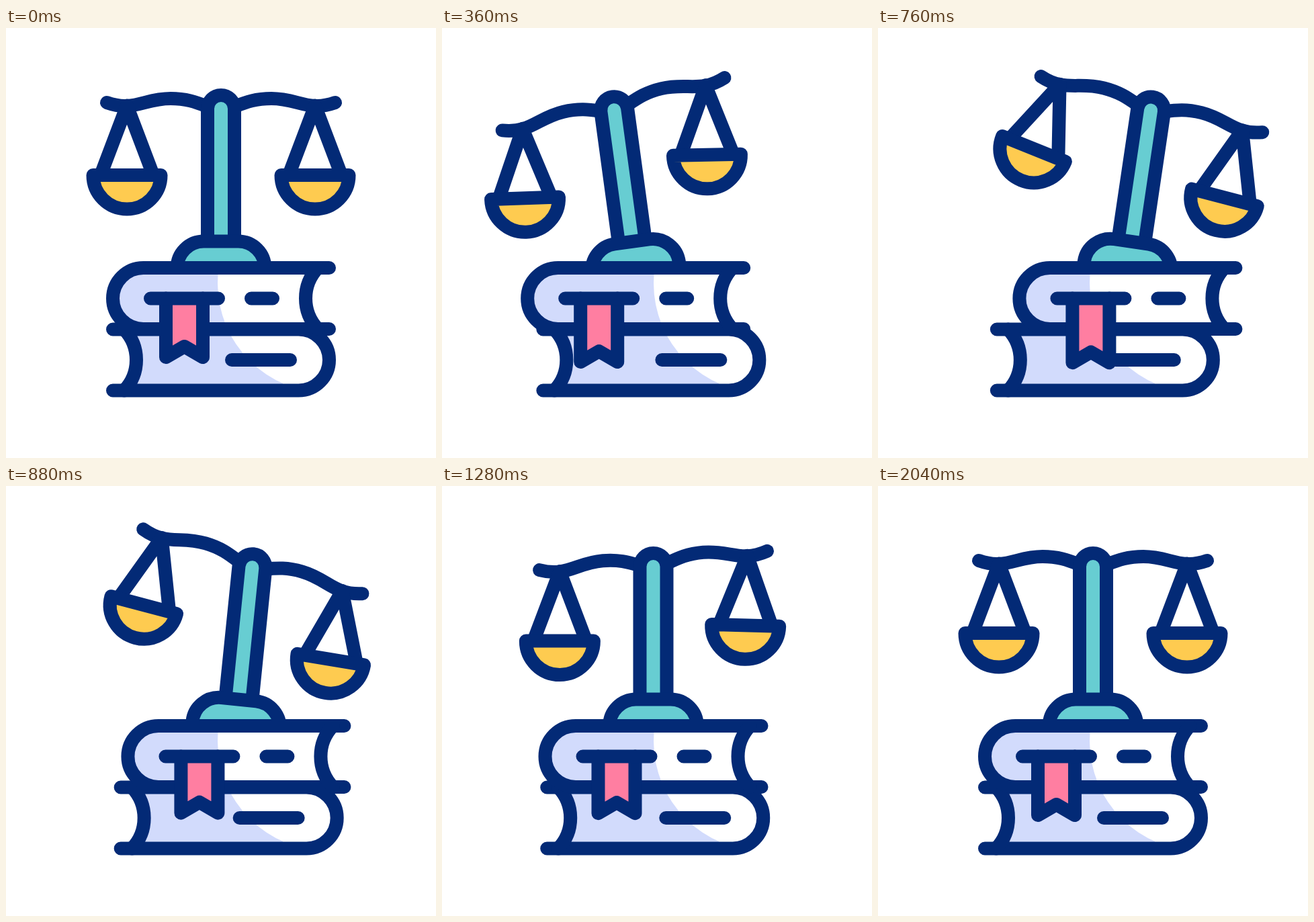
Write an HTML page with a canvas that moves like this. It is 640x640 px and loops after 2240 ms.

```html
<!DOCTYPE html>
<html lang="en">
<head>
<meta charset="utf-8">
<title>Scales on books</title>
<style>
html, body { margin: 0; width: 100%; height: 100%; overflow: hidden; background: #fff; }
canvas { display: block; width: 640px; height: 640px; }
</style>
</head>
<body>
<canvas id="stage" width="640" height="640"></canvas>
<script>
const ctx = document.getElementById('stage').getContext('2d');
const NAVY = '#032a76', TEAL = '#67cdd2', GOLD = '#fecb50', PINK = '#ff7ea1', SHADE = '#d2dbfc';
const LOOP = 2240, STEP = 40, LAST = 2040;
const QUICKEN = 0.82;

const smooth = p => p * p * (3 - 2 * p);

// Swings from rest through the peaks: the first is reached at `first`,
// the others one beat apart, each beat `ratio` times the one before.
function swing(t, start, first, beat, ratio, ...peaks) {
  let from = 0, end = first;
  for (const peak of peaks) {
    if (t < end) {
      const p = Math.max(0, (t - start) / (end - start));
      return from + (peak - from) * smooth(p);
    }
    from = peak;
    start = end;
    end += beat;
    beat *= ratio;
  }
  return from;
}

// Each part lags behind the one that carries it.
function pose(t) {
  return {
    topBook: swing(t, 0, 280, 440, QUICKEN, -40, 54, -22, 0),
    lowBook: swing(t, 0, 240, 280, 1, -24, 15, 18, -14, 0),
    column: swing(t, 180, 440, 340, QUICKEN, -10, 8.6, -0.9, 0),
    beam: swing(t, 180, 490, 400, QUICKEN, -9, 10.6, -5.5, 0),
    panLeft: swing(t, 300, 550, 245, 1, -14, 24, -9, 0, 2.8, -1, 0),
    panRight: swing(t, 300, 550, 245, 1, -8, 16, -7.4, 1.5, 0.4, -1, 0),
    ribbon: swing(t, 200, 580, 475, 1, 18.4, -13, 9, 0)
  };
}

function turn(x, y, deg) {
  ctx.translate(x, y);
  ctx.rotate(deg * Math.PI / 180);
  ctx.translate(-x, -y);
}

function group(draw) {
  ctx.save();
  draw();
  ctx.restore();
}

function shape(d, fill, cap = 'round') {
  const path = new Path2D(d);
  if (fill) {
    ctx.fillStyle = fill;
    ctx.fill(path);
  }
  ctx.lineCap = cap;
  ctx.stroke(path);
}

// Half of the beam with its pan; `side` is -1 for left, 1 for right.
function arm(side, angle) {
  group(() => {
    ctx.translate(320, 0);
    ctx.scale(side, 1);
    shape('M170 111 C130 125 115 105 75 105 C52 105 38 110 20 117');
    turn(140, 115.5, side * angle);
    shape('M101 218.5 L140 115.5 L179 218.5');
    shape('M89.5 219 H190.5 A50.5 50.5 0 0 1 89.5 219 Z', GOLD);
  });
}

function scales(s) {
  group(() => {
    ctx.translate(s.topBook, 0);
    turn(320, 357, s.column);
    group(() => {
      const tilt = s.column + s.beam;
      turn(320, 111, s.beam);
      arm(-1, s.panLeft - tilt);
      arm(1, s.panRight - tilt);
    });
    shape('M300 317 V120 A20 20 0 0 1 340 120 V317', TEAL, 'butt');
    shape('M254.7 365 V357 A39.5 39.5 0 0 1 294.2 317.5 H345.8 A39.5 39.5 0 0 1 385.3 357 V365', TEAL, 'butt');
  });
}

// One book, open side to the right; the lower one is mirrored.
function book(dx, y, mirror) {
  group(() => {
    ctx.translate(320 + dx, y);
    ctx.scale(mirror ? -1 : 1, 1);
    ctx.translate(-320, 0);
    const edge = 'M464.2 0 A66 66 0 0 0 464.2 91';
    const body = new Path2D(`${edge} H204.5 A45.5 45.5 0 0 1 204.5 0 Z`);
    ctx.fillStyle = '#fff';
    ctx.fill(body);
    group(() => {
      ctx.clip(body);
      // The light area keeps its place on the stage.
      ctx.setTransform(1, 0, 0, 1, 0, 0);
      ctx.fillStyle = SHADE;
      ctx.fillRect(0, 340, 412, 220);
      ctx.fillStyle = '#fff';
      ctx.beginPath();
      ctx.arc(478, 380, 163, 0, 2 * Math.PI);
      ctx.fill();
    });
    shape('M481 0 H204.5 A45.5 45.5 0 0 0 204.5 91 H481');
    shape(edge);
  });
}

function ribbon(drop) {
  const tip = 490 + drop;
  shape(`M238 402.5 V${tip} l27.5 -16 l27.5 16 V402.5`, PINK);
}

function draw(t) {
  const s = pose(t);
  ctx.fillStyle = '#fff';
  ctx.fillRect(0, 0, 640, 640);
  ctx.strokeStyle = NAVY;
  ctx.lineWidth = 20;
  ctx.lineJoin = 'round';

  scales(s);
  book(s.lowBook, 448.5, true);
  group(() => {
    ctx.translate(s.lowBook, 0);
    shape('M336 494 H423');
  });
  book(s.topBook, 357, false);
  group(() => {
    ctx.translate(s.topBook, 0);
    ribbon(s.ribbon);
    shape('M215 402.5 H316 M365 402.5 H397');
  });
}

const start = performance.now();
function tick() {
  const t = (performance.now() - start) % LOOP;
  draw(Math.min(LAST, Math.floor(t / STEP) * STEP));
  requestAnimationFrame(tick);
}
tick();
</script>
</body>
</html>
```
